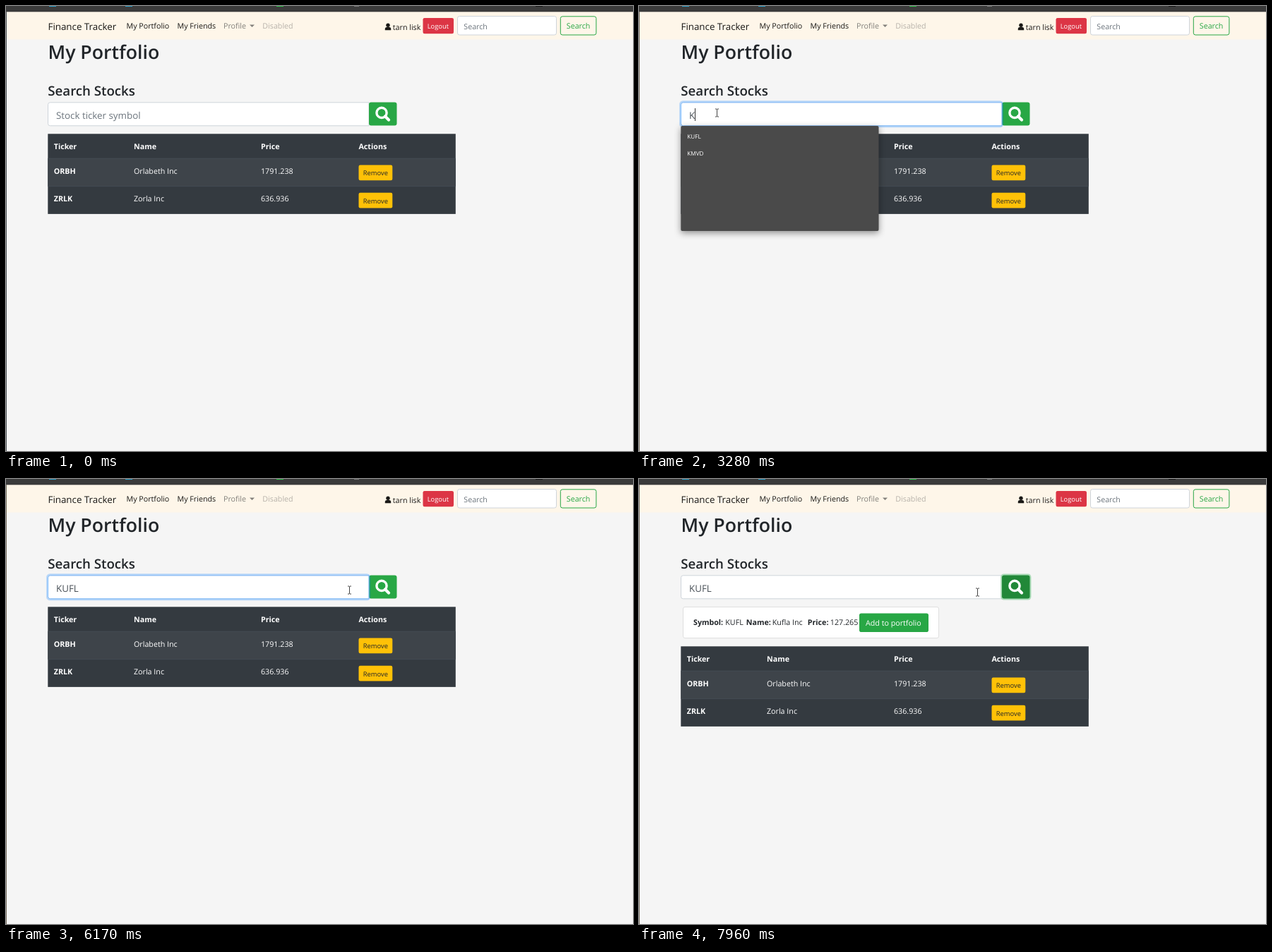
Animation, 888 px wide and 631 px high, one loop 8 s. Source, as an HTML page:

```html
<!DOCTYPE html>
<html lang="en">
<head>
<meta charset="utf-8">
<title>Finance Tracker</title>
<style>
  html, body { margin: 0; width: 100%; height: 100%; overflow: hidden; background: #f5f5f5; }
  svg { display: block; width: 888px; height: 631px; }
  text { font: 10.7px "Open Sans", "Noto Sans", sans-serif; fill: #212529; white-space: pre; text-rendering: geometricPrecision; }
  .h1 { font-size: 26.7px; font-weight: 600; }
  .h3 { font-size: 18.7px; font-weight: 600; }
  .lg { font-size: 13.35px; }
  .sm { font-size: 9.35px; }
  .item { font-size: 8.2px; fill: #fff; }
  .b { font-weight: 700; }
  .w { fill: #fff; }
  .green { fill: #28a745; }
  .hint { fill: #6c757d; }
  .typed { fill: #495057; }
  .nav { fill: #1a1917; }
  .dim { fill: #82807b; }
  .off { fill: #b7b2aa; }
  .field { fill: #fff; stroke: #ced4da; }
  .menu { filter: drop-shadow(0 3px 5px rgba(0, 0, 0, .42)); }
</style>
</head>
<body>
<svg viewBox="0 0 888 631">
  <rect width="888" height="631" fill="#f5f5f5"/>
  <rect y="8" width="888" height="39.5" fill="#fef6e9"/>
  <rect width="888" height="8.3" fill="#3b3b3b"/>
  <path d="M61 .5h10M169 .5h10" stroke="#2d9fc9"/>
  <path d="M383 .5h10" stroke="#2fc04a"/>
  <path d="M493 .5h7" stroke="#777"/>
  <path d="M750 .5h10" stroke="#151515"/>
  <rect id="edge" y="8" width="1" height="623"/>

  <text class="nav lg" x="59.5" y="33.5">Finance Tracker</text>
  <text class="nav" x="170.5" y="32.4">My Portfolio</text>
  <text class="nav" x="242.5" y="32.4">My Friends</text>
  <text class="dim" x="308" y="32.4">Profile</text>
  <path class="dim" d="M345 26.5h7l-3.5 3.5z"/>
  <text class="off" x="363.3" y="32.4">Disabled</text>
  <g class="nav">
    <circle cx="541" cy="27.3" r="2.7"/>
    <path d="M536.8 34.2v-1.6q0-2.7 2.4-2.7h3.6q2.4 0 2.4 2.7v1.6z"/>
  </g>
  <text class="nav" x="547.8" y="33.5">tarn lisk</text>
  <rect x="590.5" y="17" width="43.5" height="22.3" rx="2.3" fill="#dc3545"/>
  <text class="w sm" x="596.7" y="32.2">Logout</text>
  <rect class="field" x="639.5" y="14.5" width="140" height="26.5" rx="2.8"/>
  <text class="hint" x="648.3" y="32.7">Search</text>
  <rect x="785.3" y="14.8" width="50.6" height="26.2" rx="2.8" fill="none" stroke="#28a745"/>
  <text class="green" x="793.8" y="32.4">Search</text>

  <text class="h1" x="59.5" y="75.3">My Portfolio</text>
  <text class="h3" x="59.3" y="127.3">Search Stocks</text>

  <g id="table"></g>

  <g id="card">
    <rect x="62.5" y="181.5" width="362" height="44" rx="2.5" fill="#fff" stroke="#dfdfdf"/>
    <text class="b" x="77" y="206.8">Symbol:</text>
    <text x="122.3" y="206.8">KUFL</text>
    <text class="b" x="151.8" y="206.8">Name:</text>
    <text x="188.8" y="206.8">Kufla Inc</text>
    <text class="b" x="238.8" y="206.8">Price:</text>
    <text x="270.8" y="206.8">127.265</text>
    <rect class="green" x="312" y="190.5" width="98" height="26.5" rx="2.8"/>
    <text class="w" x="321" y="207.8">Add to portfolio</text>
  </g>

  <path class="field" d="M514 136.8H62.5q-3 0-3 3v27q0 3 3 3H514z"/>
  <rect id="halo" x="512.2" y="134.5" width="43.2" height="37" rx="4.5" fill="#a8dab5"/>
  <rect id="go" x="514" y="136.6" width="39.5" height="32.9" rx="3"/>
  <g fill="none" stroke="#fff" stroke-width="3.4">
    <circle cx="532" cy="151.4" r="7.1"/>
    <path d="M537 156.5l5 5" stroke-width="4.2" stroke-linecap="round"/>
  </g>
  <g id="focus" fill="none">
    <rect x="58.2" y="135.4" width="456.9" height="35.8" rx="4" stroke="#007bff" stroke-opacity=".25" stroke-width="2.3"/>
    <path d="M514 136.8H62.5q-3 0-3 3v27q0 3 3 3H514z" stroke="#80bdff"/>
  </g>
  <text id="value" class="lg" x="71" y="159.6"></text>
  <rect id="caret" y="145" width="1" height="18" fill="#333"/>

  <g id="menu">
    <rect id="menuBox" class="menu" x="59.3" y="170" width="280.2" rx="2" fill="#4a4a4a"/>
    <g id="items"></g>
  </g>

  <g id="cursor">
    <circle id="glow" r="8" cx="-1" cy="-1" fill="#f4e800" fill-opacity=".7"/>
    <path id="ibeam" d="M-2.5-5.5h2L0-5l.5-.5h2M0-5V5M-2.5 5.5h2L0 5l.5.5h2" fill="none" stroke="#444"/>
    <path id="arrow" d="M0 0v15.5l3.6-3.4 2.4 5.5 2.4-1-2.4-5.4h5z" fill="#fff" stroke="#111" stroke-width=".9"/>
    <path id="hand" d="M-1.4.8Q0-1 1.4.8V6q1.5-1 2.4.4 1.5-.8 2.2.6 2-.5 2.1 1.2v3.3q0 2-1.3 3.6v1H-1v-1L-5 9.7q-.8-1.8 1-1.9l2.6 2z" fill="#fff" stroke="#111" stroke-width=".9" stroke-linejoin="round"/>
  </g>
</svg>
<script>
const LOOP = 8000;
const $ = id => document.getElementById(id);
const label = (x, y, cls, s) => `<text x="${x}" y="${y}" class="${cls}">${s}</text>`;
const show = (id, on) => $(id).setAttribute('visibility', on ? 'inherit' : 'hidden');
const between = (t, a, b) => t >= a && t < b;

function buildTable() {
  const cols = [67.7, 181, 361, 499.5];
  const rows = [['ORBH', 'Orlabeth Inc', '1791.238'], ['ZRLK', 'Zorla Inc', '636.936']];
  let out = '<rect x="59.3" y="181.3" width="577.5" height="113.6" fill="#343a40"/>' +
    '<rect x="59.3" y="216" width="577.5" height="39.5" fill="#3e444a"/>' +
    '<path d="M59.3 216.2h577.5M59.3 255.6h577.5" stroke="#454d55" stroke-width=".9"/>';
  ['Ticker', 'Name', 'Price', 'Actions'].forEach((s, i) => out += label(cols[i], 203.2, 'b w', s));
  rows.forEach((row, r) => {
    const y = r * 39.2;
    row.forEach((s, i) => out += label(cols[i], 238.2 + y, i ? 'w' : 'b w', s));
    out += `<rect x="499.5" y="${225.5 + y}" width="47.8" height="21.8" rx="2.2" fill="#ffc107"/>`;
    out += label(505.8, 240.4 + y, 'sm', 'Remove');
  });
  $('table').innerHTML = out;
}

// Suggestions and typed text, each valid from its start time
const ALL = ['KUFL', 'ORBH', 'ZRLK', 'Orbhasdfasdf', 'KMVD', 'FIDFFOBB'];
const MENU = [
  [0, [], 0], [1720, ALL, 6], [3280, ['KUFL', 'KMVD'], 6], [3740, ['KUFL'], 1], [4050, [], 0]
];
const TYPED = [[0, ''], [3280, 'K'], [3740, 'KU'], [3970, 'KUF'], [4050, 'KUFL']];
const CARET = [[1720, 2180], [2740, 4590], [5140, 5700], [6240, 6480]];
const at = (list, t) => list.filter(e => e[0] <= t).pop();

// Pointer moves: start, end, way points; sampled in short steps
const MOVES = [
  [530, 1320, [[794, 612], [520, 440], [230, 290], [72, 190]]],
  [1400, 1560, [[88, 172], [110, 151]]],
  [5700, 6480, [[114, 151], [310, 153], [490, 157], [532, 157]]],
  [6710, 6710, [[532, 157]]],
  [7320, 7960, [[530, 157], [500, 159], [479, 160]]]
];
const STEP = 78;

function pointer(t) {
  const move = at(MOVES, t);
  if (!move) return null;
  const [start, end, pts] = move;
  const q = Math.floor((t - start) / STEP + .01) * STEP;
  const p = end > start ? Math.min(1, q / (end - start - 10)) : 1;
  const u = p * p * (3 - 2 * p) * (pts.length - 1);
  const i = Math.min(Math.floor(u), pts.length - 2);
  if (i < 0) return pts[0];
  return pts[i].map((v, k) => Math.round(v + (pts[i + 1][k] - v) * (u - i)));
}

function draw(t) {
  const focused = between(t, 1720, 6480);
  const pressed = between(t, 6480, 6560);
  const pos = pointer(t);
  const inField = pos && pos[1] > 136 && pos[1] < 170;
  const onButton = inField && pos[0] >= 514 && pos[0] < 554;

  $('edge').setAttribute('fill', t < 1640 ? '#50555a' : '#7b7263');
  show('card', t >= 6860);
  $('table').setAttribute('transform', `translate(0 ${t >= 6860 ? 56 : 0})`);
  show('focus', focused);
  show('halo', t >= 6480);
  $('go').setAttribute('fill', pressed ? '#1e7e34' : onButton || t >= 6480 ? '#218838' : '#28a745');

  const typed = at(TYPED, t)[1];
  const value = $('value');
  value.textContent = typed || 'Stock ticker symbol';
  value.setAttribute('class', typed ? 'lg typed' : 'lg hint');
  show('caret', CARET.some(([a, b]) => between(t, a, b)));
  $('caret').setAttribute('x', typed ? Math.round(71 + value.getComputedTextLength()) : 71);

  const [, items, rows] = at(MENU, t);
  show('menu', rows > 0);
  $('menuBox').setAttribute('height', rows ? 30 + (rows - 1) * 23.8 : 0);
  $('items').innerHTML = items.map((s, i) => label(68.3, 188.3 + i * 23.8, 'item', s)).join('');

  show('cursor', pos);
  for (const id of ['ibeam', 'arrow', 'hand', 'glow']) show(id, false);
  if (!pos) return;
  show(onButton ? 'hand' : inField ? 'ibeam' : 'arrow', true);
  show('glow', between(t, 1640, 1790) || pressed);
  $('cursor').setAttribute('transform', `translate(${pos[0] + .5} ${pos[1] + .5})`);
}

buildTable();
const begin = performance.now();
function tick() {
  draw((performance.now() - begin) % LOOP);
  requestAnimationFrame(tick);
}
tick();
</script>
</body>
</html>
```
